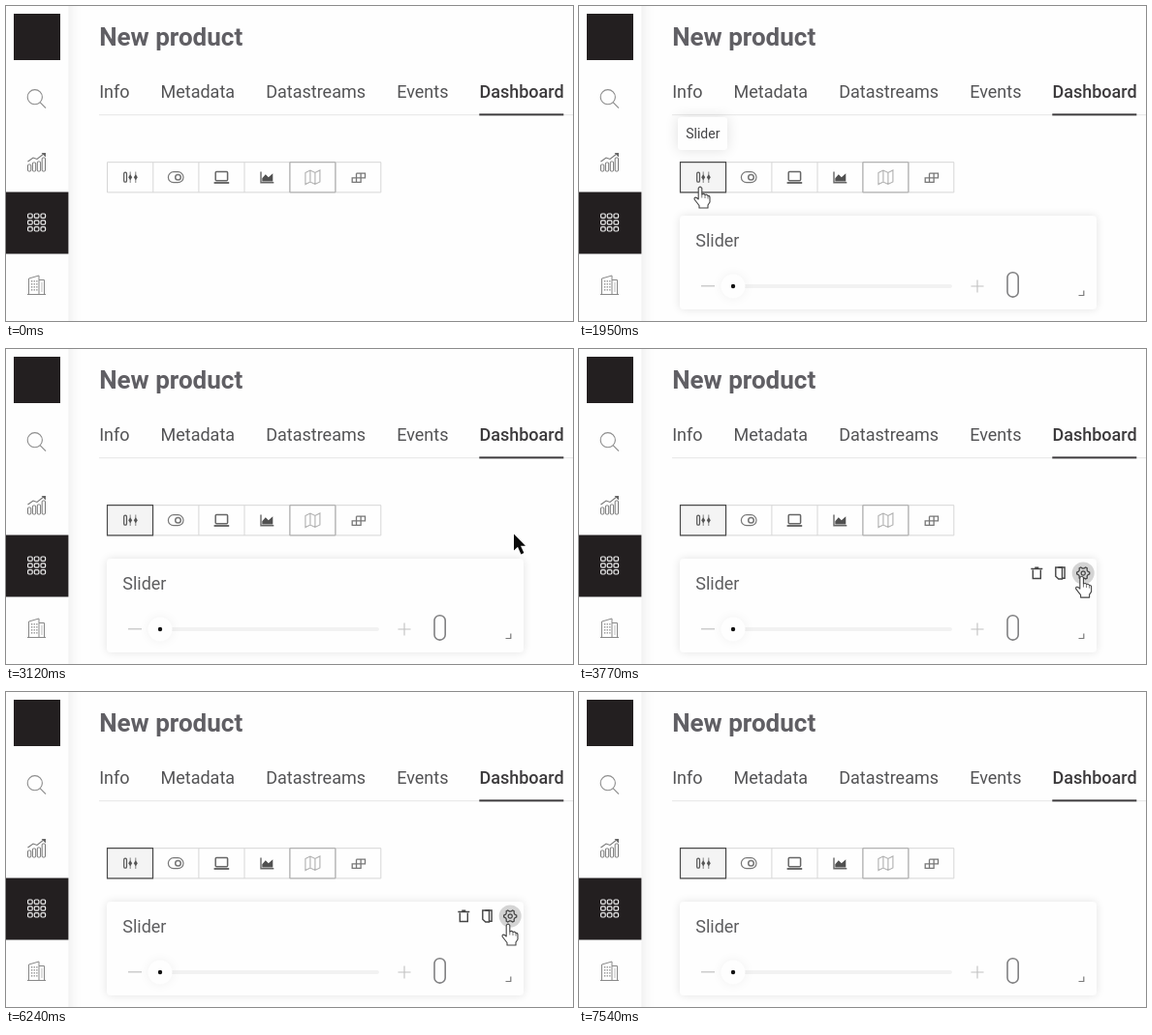
Recreate the animation shown at these times as an HTML page with a canvas. Size 585 by 326 pixels, loop 7.67 s.

```html
<!DOCTYPE html>
<html lang="en">
<head>
<meta charset="utf-8">
<title>Dashboard widget</title>
<style>
html, body { margin: 0; width: 100%; height: 100%; overflow: hidden; background: #fefefe; }
canvas { display: block; }
</style>
</head>
<body>
<canvas id="stage" width="585" height="326"></canvas>
<script>
const ctx = document.getElementById('stage').getContext('2d');
const LOOP = 7670, STEP = 130;
const INK = '#231f20';

// ---- helpers ----
function rect(x, y, w, h, color) {
  ctx.fillStyle = color;
  ctx.fillRect(x, y, w, h);
}

function text(str, x, y, size, color, weight = 400) {
  ctx.font = `${weight} ${size}px Roboto, sans-serif`;
  ctx.fillStyle = color;
  ctx.fillText(str, x, y);
}

function paint(path, stroke, width = 1, fill) {
  if (fill) { ctx.fillStyle = fill; ctx.fill(path); }
  if (stroke) {
    ctx.strokeStyle = stroke;
    ctx.lineWidth = width;
    ctx.stroke(path);
  }
}

function draw(d, stroke, width, fill) {
  paint(new Path2D(d), stroke, width, fill);
}

function round(x, y, w, h, r, stroke, width, fill) {
  const p = new Path2D();
  p.roundRect(x, y, w, h, r);
  paint(p, stroke, width, fill);
}

function circle(x, y, r, stroke, width, fill) {
  const p = new Path2D();
  p.arc(x, y, r, 0, Math.PI * 2);
  paint(p, stroke, width, fill);
}

function at(x, y, fn) {
  ctx.save();
  ctx.translate(x, y);
  fn();
  ctx.restore();
}

function shadowed(blur, alpha, fn) {
  ctx.save();
  ctx.shadowColor = `rgba(0,0,0,${alpha})`;
  ctx.shadowBlur = blur;
  fn();
  ctx.restore();
}

// ---- page ----
function sidebar() {
  shadowed(14, 0.1, () => rect(0, -20, 64.4, 366, '#fefefe'));
  rect(8, 8, 48, 48, INK);

  circle(29.8, 94.2, 7.6, '#8c8c8c', 1.1);
  draw('M35.3 99.8L41 105.6', '#8c8c8c', 1.2);

  [7, 9, 10, 14].forEach((h, i) =>
    round(22.5 + i * 4.9, 171 - h, 3.3, h, 1, '#777', 1));
  draw('M22.5 161L28 157L32 158.5L39.5 152.5', '#777', 1.1);
  draw('M36.5 152H41V156.5Z', null, 0, '#666');

  rect(0, 192.5, 64.4, 64, INK);
  for (let i = 0; i < 9; i++) {
    round(22.6 + i % 3 * 6.7, 215 + Math.floor(i / 3) * 6.8, 4.6, 4.4, 1.2, '#eee', 1.2);
  }

  draw('M23.5 298V282L34 279V298M34 283.5H39.5V298M22 298.5H41', '#888', 1);
  for (let i = 0; i < 12; i++) {
    rect(26 + i % 3 * 2.6, 284 + Math.floor(i / 3) * 3, 1.3, 1.6, '#999');
  }
  draw('M37 286V296', '#bbb', 1);
}

function header() {
  text('New product', 96.2, 41.2, 26, '#605f64', 700);
  const tabs = [['Info', 96.2], ['Metadata', 159.5], ['Datastreams', 268.2], ['Events', 403.2]];
  for (const [name, x] of tabs) text(name, x, 95.3, 18, '#535355');
  text('Dashboard', 488.4, 95.3, 18, '#3c3a3c', 500);
  rect(96, 112.2, 489, 1, '#e6e6e6');
  rect(488.3, 111.4, 87, 2, '#3c3a3c');
}

// ---- toolbar ----
const icons = [
  () => {
    round(-6.3, -4.8, 2.8, 10, 1.3, '#555', 1.2);
    for (const x of [0.2, 5.8]) {
      draw(`M${x} -5.5V6`, '#777', 0.9);
      draw(`M${x} -2.8L${x + 2} 0.2L${x} 3.2L${x - 2} 0.2Z`, null, 0, '#555');
    }
  },
  () => {
    round(-7.7, -5.3, 15.6, 11, 5.5, '#777', 1.2);
    circle(2.4, 0.2, 2.8, '#777', 1.5);
  },
  () => {
    round(-6, -5.6, 12.4, 9.4, 1, '#666', 1.5);
    draw('M-7.6 6H8', '#666', 1.9);
  },
  () => {
    draw('M-6.3 -5.5V5.7H7', '#666', 1.4);
    draw('M-5 4.5V1.2L-1.5 -2.8L1.5 0.2L6 -3.8V4.5Z', null, 0, '#505050');
  },
  () => draw('M-7.5 -4.5L-2.5 -7L2.5 -4.5L7.5 -7V5L2.5 7.5L-2.5 5L-7.5 7.5ZM-2.5 -7V5M2.5 -4.5V7.5', '#b0b0b0', 1.1),
  () => draw('M-2 -3.8H7V0.8H-6.3V5.4H2.6V-3.8M-2 -3.8V5.4', '#777', 1.3)
];

function toolbar(active, hover) {
  const w = 47.1;
  round(104.5, 161.7, 282.3, 31.2, 0, '#d6d6d6', 1);
  for (let i = 1; i < 6; i++) rect(104.2 + i * w, 161.7, 1, 31.2, '#d6d6d6');
  round(292.8, 161.7, 47, 31.2, 0, '#ababab', 1);
  if (active || hover) {
    round(104.5, 161.7, 47, 31.2, 0, '#4a4a4a', 1.2, '#f4f4f4');
  }
  icons.forEach((icon, i) => at(128 + i * w, 177, icon));
}

function tooltip() {
  shadowed(14, 0.12, () => round(102, 115, 51, 34, 3, null, 0, '#fefefe'));
  text('Slider', 110.2, 137.2, 14, '#444446');
}

// ---- slider card ----
function card() {
  shadowed(10, 0.11, () => round(104, 217, 430, 97, 4, null, 0, '#fefefe'));
  text('Slider', 120.2, 249.2, 18, '#5e5e60');
  rect(126, 289.2, 14, 1.2, '#c0c0c0');
  round(160, 288, 225, 4, 2, null, 0, '#f2f2f2');
  shadowed(12, 0.06, () => circle(159, 290, 12.5, null, 0, '#fefefe'));
  circle(159, 290, 2.2, null, 0, '#111');
  draw('M404.5 290H417.5M411 283.5V296.5', '#c0c0c0', 1.1);
  round(442, 275.7, 11.2, 25.4, 5.4, '#808082', 1.6);
  draw('M515.5 299.5H520.8V294.5', '#7a7a7a', 1.2);
}

function cardTools(hot) {
  at(472.3, 232, () => {
    draw('M-6 -4.5H6M-2 -5.8H2', '#444', 1.4);
    draw('M-4 -3.5V5.5H4V-3.5', '#444', 1.4);
  });
  at(496.3, 232, () => {
    draw('M-2 -6H4.8V5.2H2', '#444', 1.4);
    draw('M-4.5 -6H2.2V6H-1.5L-4.5 3.2Z', '#444', 1.4);
  });
  if (hot) circle(520.2, 232, 11.5, null, 0, '#d4d4d4');
  at(520.2, 232, () => {
    const gear = new Path2D();
    for (let i = 0; i < 24; i++) {
      const a = (i - 0.5) * Math.PI / 12;
      const r = i % 4 < 2 ? 6.6 : 5;
      gear.lineTo(Math.cos(a) * r, Math.sin(a) * r);
    }
    gear.closePath();
    paint(gear, '#444', 1.3);
    circle(0, 0, 2.1, '#444', 1.2);
  });
}

// ---- pointer ----
const ARROW = 'M0 0V17L4 13.4L7.4 21L10.4 19.6L7 12.3H12Z';
const HAND = 'M-1.8 1.5Q0 -1.2 1.8 1.5V8Q4 6.5 5 8.5Q7 7.5 8 9.5Q10 9 10 11.5V16L8 19V22H-1V19.5L-6 13Q-6 10.2 -3.5 11.5L-1.8 13Z';

function pointer(x, y, hand) {
  ctx.lineJoin = 'round';
  at(x, y, () => {
    if (hand) {
      draw(HAND, '#444', 1.1, '#fff');
      draw('M1.8 8V11.5M5 9V12M8 10V12.5', '#666', 0.9);
    } else {
      draw(ARROW, '#fff', 2, '#0a0a0a');
      draw(ARROW, null, 0, '#0a0a0a');
    }
  });
  ctx.lineJoin = 'miter';
}

// time, x, y
const route = [
  [780, 113, 258], [1300, 119, 196.4], [1560, 125, 187], [2340, 125, 187],
  [3120, 524, 191.4], [3250, 524, 193], [3900, 518, 240], [6240, 518, 240], [6890, 592, 186]
];

function position(t) {
  const last = route.length - 1;
  if (t < route[0][0] || t >= route[last][0]) return null;
  const i = route.findIndex(p => p[0] > t) - 1;
  const [t0, x0, y0] = route[i], [t1, x1, y1] = route[i + 1];
  const u = (t - t0) / (t1 - t0), e = u * u * (3 - 2 * u);
  return [x0 + (x1 - x0) * e, y0 + (y1 - y0) * e];
}

function inside(p, x, y, w, h) {
  return !!p && p[0] >= x && p[0] < x + w && p[1] >= y && p[1] < y + h;
}

function render(t) {
  const p = position(t);
  const added = t >= 1950;
  const onButton = inside(p, 104, 161, 48, 32) && t >= 1560;
  const onCard = added && inside(p, 104, 217, 430, 97);
  const onGear = onCard && Math.hypot(p[0] - 520, p[1] - 232) < 11.5;

  rect(0, 0, 585, 326, '#fefefe');
  sidebar();
  header();
  toolbar(added, onButton);
  if (added) card();
  if (onCard) cardTools(onGear);
  if (onButton) tooltip();
  if (p) pointer(p[0], p[1], onButton || onGear);
}

const start = performance.now();
function tick() {
  const t = (performance.now() - start) % LOOP;
  render(Math.floor(t / STEP) * STEP);
  requestAnimationFrame(tick);
}
tick();
</script>
</body>
</html>
```
